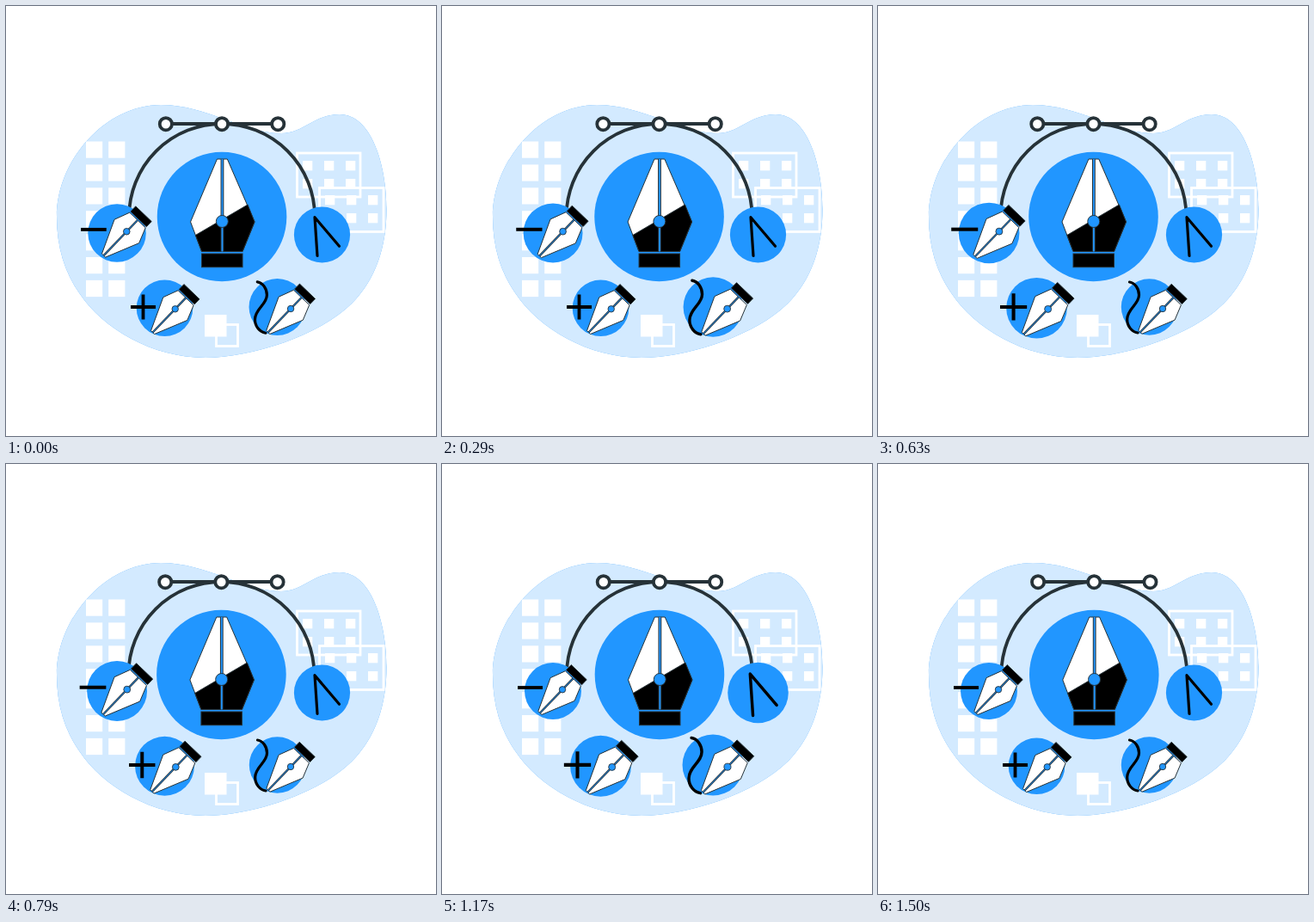
An HTML page that plays this animation: 500 px wide and 500 px high, repeating every 1540 ms.

```html
<!DOCTYPE html>
<html lang="en">
<head>
<meta charset="utf-8">
<title>Pen tools</title>
<style>
  html, body { margin: 0; width: 100%; height: 100%; overflow: hidden; background: #fff; }
  svg { display: block; width: 100vw; height: 100vh; }
  .nib * { vector-effect: non-scaling-stroke; }
</style>
</head>
<body>
<svg viewBox="0 0 500 500">
  <defs>
    <path id="blob" d="M59 245C59 180 115 115 180 115C235 115 275 148 320 148C346 148 358 126 388 126C425 126 442.5 185 442.5 236C442.5 280 430 318 402 346C365 383 285 409 232 409C170 409 113 375 86 335C68 310 59 280 59 245Z"/>
    <g id="small" class="nib">
      <g transform="rotate(223.8) scale(.52)">
        <path d="M-5.5-72.5H5.5L37.5 .5 24 34.5H-24L-37 .5Z" fill="#fff" stroke="#263238"/>
        <path d="M0-72.5V34.5" stroke="#263238" stroke-width="2.4"/>
        <path d="M0-72.5V34.5" stroke="#2196ff" stroke-width=".9"/>
        <rect x="-24" y="37.5" width="48" height="16" stroke="#263238"/>
      </g>
      <circle r="3.7" fill="#2196ff" stroke="#263238" stroke-width=".9"/>
    </g>
  </defs>

  <use href="#blob" fill="#2196ff"/>
  <use href="#blob" fill="#fff" opacity=".8"/>
  <g id="tiles" fill="#fff"></g>
  <g fill="none" stroke="#fff" stroke-width="2.8">
    <rect x="338.5" y="171" width="73.5" height="51"/>
    <rect x="364.5" y="211.5" width="74.5" height="51"/>
    <rect x="244.5" y="370.5" width="25" height="25"/>
  </g>

  <g id="main">
    <g fill="none" stroke="#263238" stroke-width="3.8">
      <path d="M143 245A108 108 0 0 1 359 245M186 137H316"/>
      <g fill="#fff">
        <circle cx="185.8" cy="137.2" r="7.1"/>
        <circle cx="251" cy="137.2" r="7.1"/>
        <circle cx="316.2" cy="137.2" r="7.1"/>
      </g>
    </g>
    <circle cx="251" cy="245" r="75.3" fill="#2196ff"/>
    <g stroke="#263238">
      <path d="M245.4 178H257.3L289 251 275 285.5H227.5L214.5 251Z" fill="#fff"/>
      <path d="M281 231L289 251 275 285.5H227.5L220.3 266.5Z"/>
      <path d="M251.4 178V285.5" stroke-width="3.8"/>
      <path d="M251.4 178V285.5" stroke="#2196ff" stroke-width="1.8"/>
      <circle cx="251.3" cy="250.5" r="7" fill="#2196ff"/>
      <rect x="227.5" y="288" width="47.5" height="15.7"/>
    </g>
  </g>

  <g id="minus">
    <circle cx="129" cy="264" r="33" fill="#2196ff"/>
    <path d="M88 260H117" stroke="#000" stroke-width="3.8"/>
    <use href="#small" x="140" y="262.3"/>
  </g>
  <g id="plus">
    <circle cx="184.5" cy="351.2" r="32.8" fill="#2196ff"/>
    <path d="M145 350H174M159.5 335.5V364.5" stroke="#000" stroke-width="3.8"/>
    <use href="#small" x="196.7" y="352.3"/>
  </g>
  <g id="curve">
    <circle cx="315.5" cy="350" r="32.7" fill="#2196ff"/>
    <path d="M292.5 321C299 322 303.5 329 303.5 336C303.5 347 290 352 289.7 364C289.5 372 295 379 302 380" fill="none" stroke="#000" stroke-width="3.2" stroke-linecap="round"/>
    <use href="#small" x="331" y="352"/>
  </g>
  <g id="angle">
    <circle cx="367.5" cy="266" r="32.6" fill="#2196ff"/>
    <path d="M362 290.5L359 245.7 387.5 279.3" fill="none" stroke="#000" stroke-width="3.2" stroke-linecap="round" stroke-linejoin="round"/>
  </g>
</svg>
<script>
const LOOP = 1540, BEAT = LOOP / 3, LAG = 25;
const $ = id => document.getElementById(id);

function tiles(x, y, cols, rows, dx, dy, size) {
  let out = '';
  for (let r = 0; r < rows; r++)
    for (let c = 0; c < cols; c++)
      out += `<rect x="${x + c * dx}" y="${y + r * dy}" width="${size}" height="${size}"/>`;
  return out;
}
$('tiles').innerHTML =
  tiles(93, 157.5, 2, 7, 26.2, 26.9, 19.2) +
  tiles(345, 180, 3, 2, 25, 21, 11.3) +
  tiles(371, 220, 3, 2, 25, 21, 11.3) +
  tiles(231, 359, 1, 1, 0, 0, 25.5);

// Age of a beat, wrapped so that it may begin shortly before zero
const age = (t, start) => ((t - start + 100) % LOOP + LOOP) % LOOP - 100;

function bump(a) {
  if (a < -35 || a > 450) return 0;
  return a < 150 ? Math.sin((a + 35) / 185 * Math.PI / 2)
                 : .5 + .5 * Math.cos((a - 150) / 300 * Math.PI);
}

function sway(a) {
  if (a < -45 || a > 620) return 0;
  return a < 160 ? (a + 45) / 205 : (620 - a) / 460;
}

const strength = (t, starts, shape) => Math.max(...starts.map(s => shape(age(t, s))));

const badges = [
  { el: $('minus'), x: 127.5, y: 264.5, amp: .08, starts: [0, BEAT + LAG] },
  { el: $('plus'), x: 184.5, y: 351, amp: .08, starts: [BEAT, 2 * BEAT] },
  { el: $('curve'), x: 320, y: 350, amp: .088, starts: [LAG, 2 * BEAT] },
  { el: $('angle'), x: 367.5, y: 266, amp: .082, starts: [2 * BEAT] }
];

function draw(t) {
  const dx = -.6 + 2.8 * strength(t, [LAG, 2 * BEAT], sway);
  $('main').setAttribute('transform', `translate(${dx} 0)`);
  for (const b of badges) {
    const s = 1 + b.amp * strength(t, b.starts, bump);
    b.el.setAttribute('transform', `translate(${b.x} ${b.y}) scale(${s}) translate(${-b.x} ${-b.y})`);
  }
}

let begin;
function tick(now) {
  begin ??= now;
  draw((now - begin) % LOOP);
  requestAnimationFrame(tick);
}
draw(0);
requestAnimationFrame(tick);
</script>
</body>
</html>
```
